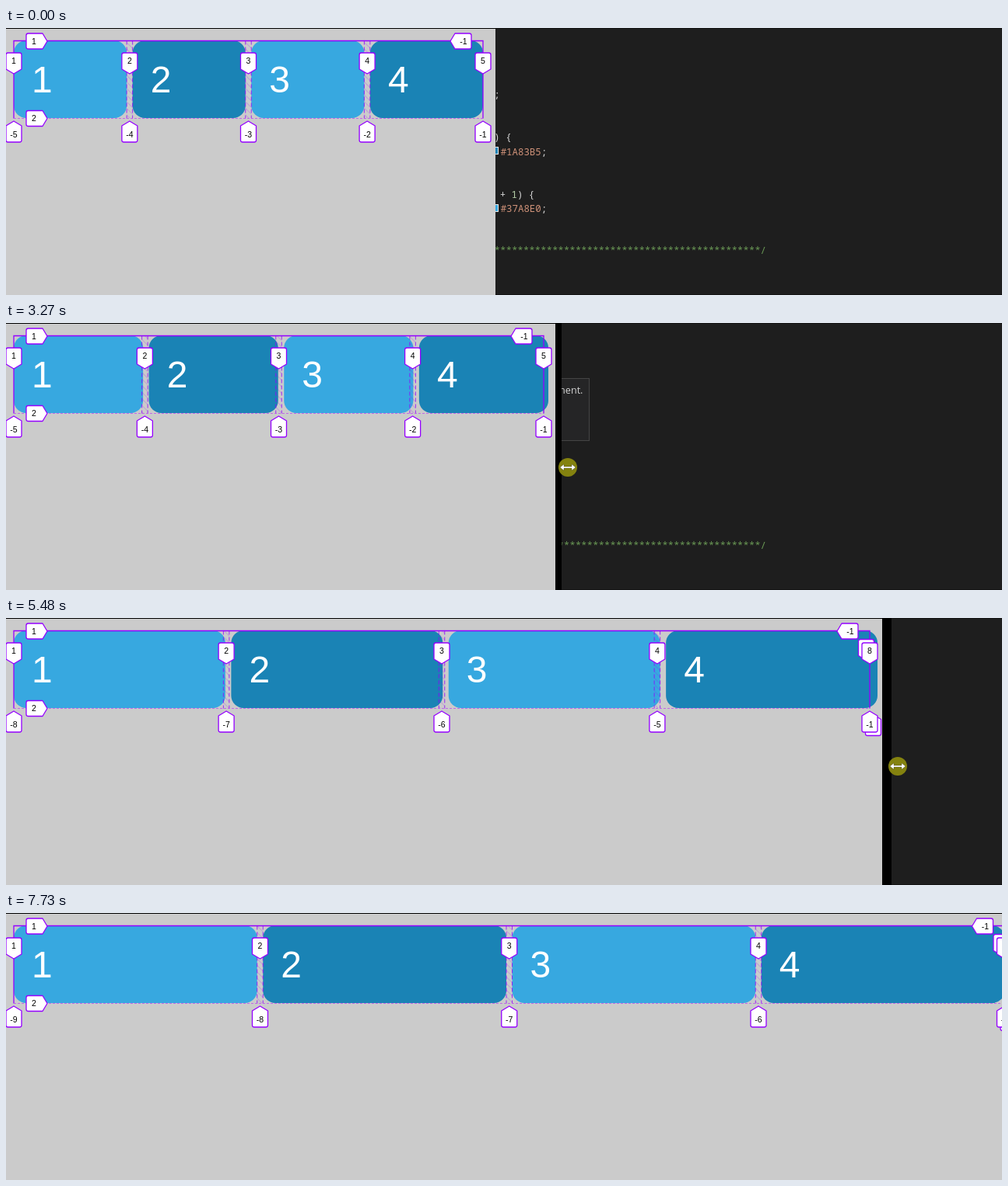
Recreate the animation shown at these times as an HTML page. Size 1280 px wide and 344 px high, loop 8910 ms.

```html
<!DOCTYPE html>
<html lang="en">
<head>
<meta charset="utf-8">
<title>Responsive grid</title>
<style>
  html, body { margin: 0; width: 100%; height: 100%; overflow: hidden; background: #000; }
  svg { display: block; }
  .code { font: 500 12.4px "Noto Sans Mono", "DejaVu Sans Mono", monospace; fill: #d4d4d4; white-space: pre; }
  .hex { fill: #ce9178; }
  .num { fill: #b5cea8; }
  .note { fill: #6a9955; text-anchor: end; }
  .tip { font: 12.65px "Open Sans", "Noto Sans", sans-serif; fill: #d4d4d4; text-anchor: end; }
  .digit { font: 48px "Liberation Sans", Arial, sans-serif; fill: #fff; }
  .label { font: 10.5px "Liberation Sans", Arial, sans-serif; fill: #000; text-anchor: middle; }
  .badge { fill: #fff; stroke: #9400ff; stroke-width: 1.3; stroke-linejoin: round; }
  .line { fill: none; stroke: #9400ff; stroke-width: 1.3; }
  .gap { stroke-width: 1; stroke-dasharray: 5 3; opacity: .8; }
  .end { stroke: #c050f0; stroke-width: 1; stroke-dasharray: 3 2; opacity: .8; }
</style>
</head>
<body>
<svg width="1280" height="344" viewBox="0 0 1280 344">
  <defs>
    <pattern id="hatch" width="6" height="6" patternUnits="userSpaceOnUse" patternTransform="rotate(-45)">
      <path d="M.5 0V6" stroke="#9400ff" opacity=".22"/>
    </pattern>
  </defs>
  <rect width="1280" height="344" fill="#141414"/>
  <rect y="1" width="1280" height="342" fill="#1e1e1e"/>
  <g class="code">
    <rect id="mark" x="600" y="151" width="88" height="17" fill="#264f78" opacity=".35"/>
    <text x="627.3" y="90">;</text>
    <text x="627.3" y="145">) {</text>
    <text x="635.7" y="163.5"><tspan class="hex">#1A83B5</tspan>;</text>
    <text x="634.7" y="218.5">+ <tspan class="num">1</tspan>) {</text>
    <text x="635.7" y="237"><tspan class="hex">#37A8E0</tspan>;</text>
    <text id="stars" class="note" x="977" y="291"></text>
    <rect x="623.5" y="153.5" width="9" height="9" fill="#1a83b5" stroke="#eee"/>
    <rect x="623.5" y="227.5" width="9" height="9" fill="#37a8e0" stroke="#eee"/>
  </g>
  <g id="hint">
    <rect x="460.5" y="71.5" width="289" height="80" fill="#252526" stroke="#454545"/>
    <text class="tip" x="741.5" y="91">Sets the background color of an element.</text>
  </g>
  <rect id="shade" height="344"/>
  <svg id="panel" height="344"></svg>
  <g id="cursor">
    <path id="arrow" d="M0 0V16.5L3.8 13 6.3 18.8 8.7 17.8 6.2 12H11.3Z" fill="#fff" stroke="#000" stroke-width=".7"/>
    <circle id="press" r="12" fill="#84820f"/>
    <path id="resize" d="M-10 0l5-4v3h10v-3l5 4-5 4v-3h-10v3z" fill="#fff" stroke="#0006" stroke-width=".6"/>
  </g>
</svg>
<script>
const LOOP = 8910, TICK = 171;
const HOVER = 8, RESIZE = 12, PRESS = 15;
const LEFT = 10, TOP = 16.5, BOTTOM = 116.5, GAP = 7.5, PITCH = 151.5;

// tick, x, y
const pointer = [
  [1, 594, 199], [4, 663, 143], [6, 636, 158], [10, 629, 170], [RESIZE, 631, 178],
  [PRESS, 636, 182], [19, 722, 186], [27, 1009, 181], [32, 1146, 191], [36, 1252, 186], [42, 1310, 181]
];

// tick, panel width, right edge of the tiles, right edge of the overlay
const layout = [
  [PRESS, 629, 613, 613], [19, 706, 697, 691], [27, 986, 971, 971],
  [32, 1126, 1120, 1110], [36, 1237, 1221, 1209], [42, 1298, 1283.5, 1283.5]
];

const $ = id => document.getElementById(id);
const show = (id, on) => $(id).setAttribute('visibility', on ? 'visible' : 'hidden');
const trackWidth = right => (right - LEFT - 3 * GAP) / 4;

function sample(keys, at) {
  const next = keys.findIndex(k => k[0] > at);
  if (next < 1) return keys.at(next).slice(1);
  const a = keys[next - 1], b = keys[next];
  const p = (at - a[0]) / (b[0] - a[0]);
  return a.slice(1).map((v, i) => v + (b[i + 1] - v) * p);
}

// A tag whose tip is at x, y; turn 0 points down.
function badge(x, y, turn, text) {
  const r = turn * Math.PI / 180;
  return `<path class="badge" transform="translate(${x} ${y}) rotate(${turn})"
      d="M0 0L-10-6V-24.500Q-10-27-7.500-27H7.500Q10-27 10-24.500V-6Z"/>
    <text class="label" x="${x + 17 * Math.sin(r)}" y="${y - 17 * Math.cos(r) + 3.7}">${text}</text>`;
}

function tiles(right) {
  const w = trackWidth(right);
  return [0, 1, 2, 3].map(i => {
    const x = LEFT + i * (w + GAP);
    return `<rect x="${x}" y="16" width="${w}" height="100" rx="16" fill="${i % 2 ? '#1a83b5' : '#37a8e0'}"/>
      <text class="digit" x="${x + 23}" y="82.5">${i + 1}</text>`;
  }).join('');
}

function overlay(right) {
  const w = trackWidth(right);
  const count = Math.floor((right - LEFT + GAP) / PITCH);
  const columnTags = (x, i, shift = 0) =>
    badge(x - shift, 59 - shift, 0, i + 1) + badge(x + shift, 120 + shift, 180, i === count ? -1 : i - count - 1);
  let lines = '', tags = '';
  for (let i = 0; i < 4; i++) {
    const x = LEFT + i * (w + GAP);
    tags += columnTags(i ? x - GAP / 2 : x, i);
    if (i) {
      lines += `<rect x="${x - GAP}" y="16" width="${GAP}" height="100" fill="url(#hatch)"/>
        <path class="line gap" d="M${x - GAP} ${TOP}V${BOTTOM}M${x} ${TOP}V${BOTTOM}"/>`;
    }
  }
  lines += `<path class="line" d="M${LEFT} ${BOTTOM}V${TOP}H${right}V${BOTTOM}"/>
    <path class="line end" d="M${LEFT} ${BOTTOM}H${right}"/>`;
  // Collapsed tracks stack their line numbers at the right edge.
  if (count > 4) tags += columnTags(right, count, 4.5);
  tags += columnTags(right, count)
    + badge(53, 17, -90, 1) + badge(53, BOTTOM, -90, 2) + badge(right - 42, 17, 90, -1);
  return lines + tags;
}

function draw(tick) {
  const [x, y] = sample(pointer, tick);
  const [width, tileEnd, gridEnd] = sample(layout, tick);

  $('shade').setAttribute('width', Math.max(width, x - 8));
  $('panel').setAttribute('width', width);
  $('panel').innerHTML = `<rect y="1" width="${width}" height="343" fill="#cbcbcb"/>`
    + tiles(tileEnd) + overlay(gridEnd);

  $('cursor').setAttribute('transform', `translate(${x} ${y})`);
  show('arrow', tick >= 1 && tick < RESIZE);
  show('resize', tick >= RESIZE);
  show('press', tick >= PRESS);
  show('hint', tick >= HOVER);
  show('mark', tick >= HOVER);
}

$('stars').textContent = '*'.repeat(60) + '/';

let current = -1;
function run() {
  const tick = Math.floor((performance.now() % LOOP + 2) / TICK);
  if (tick !== current) draw(current = tick);
  requestAnimationFrame(run);
}
run();
</script>
</body>
</html>
```
